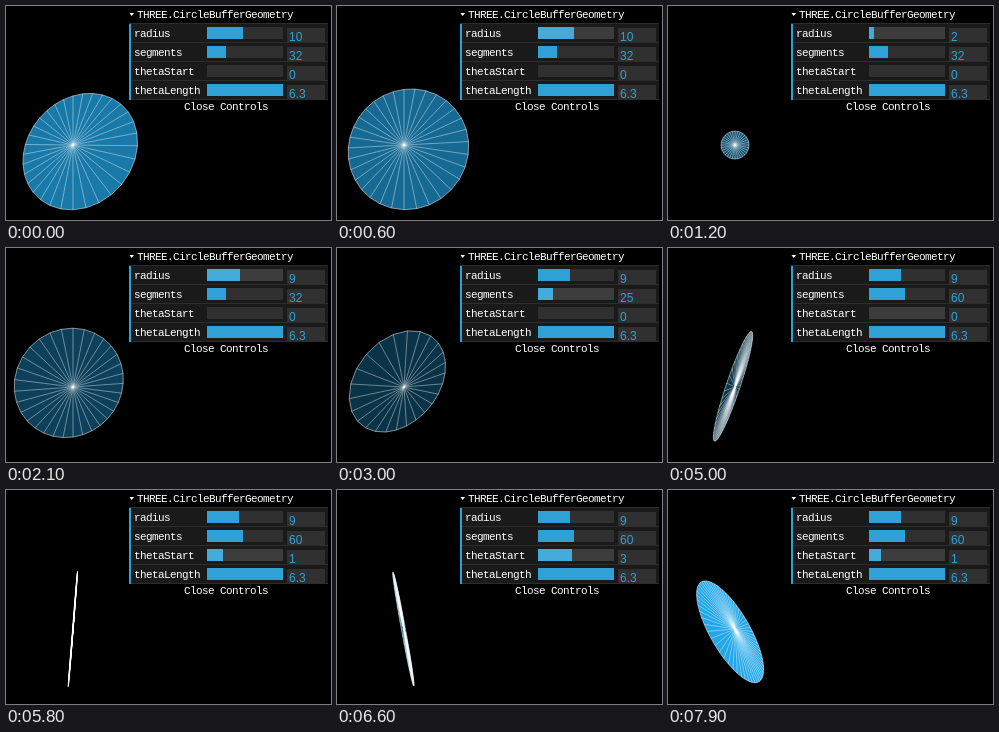
An HTML page with a canvas that plays this animation: 325x214 px, repeating every 8000 ms.

```html
<!DOCTYPE html>
<html>
<head>
<meta charset="utf-8">
<style>
html, body { margin: 0; width: 325px; height: 214px; overflow: hidden; background: #000; }
canvas { display: block; }
</style>
</head>
<body>
<canvas id="stage" width="325" height="214"></canvas>
<script>
const ctx = document.getElementById('stage').getContext('2d');
const LOOP = 8000, TAU = Math.PI * 2;
const CX = 67, CY = 139, CAMERA = 30, UNIT = 6.14;
const START_ANGLE = -0.427, SPIN = 0.3305; // radians, radians per second

// Linear interpolation through [time, value] points
function track(points, t) {
  if (t <= points[0][0]) return points[0][1];
  for (let i = 1; i < points.length; i++) {
    const [t0, a] = points[i - 1], [t1, b] = points[i];
    if (t <= t1) return a + (b - a) * (t - t0) / (t1 - t0);
  }
  return points[points.length - 1][1];
}

const radiusKeys = [[700, 10], [1200, 2.25], [1720, 10], [1900, 9.4], [2200, 9]];
const segmentKeys = [[2750, 32], [3000, 25], [3200, 21], [3750, 60]];
const startKeys = [[5100, 0], [6600, 2.85], [6900, 2.85], [7800, 1]];

function rect(x, y, w, h, color) {
  ctx.fillStyle = color;
  ctx.fillRect(x, y, w, h);
}

function text(str, x, y, font, color, spacing) {
  ctx.font = font;
  ctx.letterSpacing = spacing;
  ctx.fillStyle = color;
  ctx.fillText(str, x, y);
}

const label = (str, x, y) =>
  text(str, x, y, '11px "Liberation Mono", monospace', '#fff', '-0.6px');

function row(i, name, fraction, value, hover) {
  const y = 18 + i * 19;
  rect(123, y, 199, 18, '#1a1a1a');
  rect(123, y + 18, 199, 1, '#2c2c2c');
  rect(123, y, 2, 19, '#2fa1d6');
  label(name, 128, y + 13);
  rect(201, y + 3, 76, 12, hover ? '#3c3c3c' : '#303030');
  rect(201, y + 3, Math.round(76 * fraction), 12, hover ? '#44abda' : '#2fa1d6');
  rect(281, y + 4, 38, 14, '#303030');
  text(value, 283, y + 17, '12px "Liberation Sans", Arial, sans-serif', '#2fa1d6', '0px');
}

function panel(t, radius, segments, start) {
  ctx.fillStyle = '#fff';
  ctx.beginPath();
  ctx.moveTo(123.5, 7);
  ctx.lineTo(128, 7);
  ctx.lineTo(125.7, 10);
  ctx.fill();
  label('THREE.CircleBufferGeometry', 131, 12);
  rect(123, 17, 199, 1, '#2c2c2c');
  row(0, 'radius', (radius - 1) / 19, radius.toFixed(0), t > 600 && t < 2300);
  row(1, 'segments', segments / 128, String(segments), t > 2700 && t < 4200);
  row(2, 'thetaStart', start / TAU, start.toFixed(0), t > 4700);
  row(3, 'thetaLength', 1, '6.3', false);
  label('Close Controls', 178, 104);
}

// Two light directions shine on the face, on top of its own glow
function shade(s, c) {
  const n = [s, -s * c, c * c];
  const key = Math.max(0, (n[0] + 2 * n[1] + n[2]) / Math.sqrt(6));
  const light = key + Math.max(0, n[1]);
  const [r, g, b] = [[7, 21], [37, 98], [52, 137]].map(([glow, k]) => Math.min(255, glow + k * light));
  return `rgb(${r}, ${g}, ${b})`;
}

function disc(angle, radius, segments, start) {
  const s = Math.sin(angle), c = Math.cos(angle);
  const rim = [];
  for (let i = 0; i < segments; i++) {
    const phi = start + i / segments * TAU;
    const x = radius * Math.cos(phi), y = radius * Math.sin(phi);
    const depth = y * s - x * s * c;
    const k = UNIT * CAMERA / (CAMERA - depth);
    rim.push([CX + x * c * k, CY - (y * c + x * s * s) * k]);
  }
  ctx.fillStyle = shade(s, c);
  ctx.beginPath();
  rim.forEach(p => ctx.lineTo(...p));
  ctx.fill();

  ctx.strokeStyle = 'rgba(255, 255, 255, 0.5)';
  rim.forEach((p, i) => {
    for (const [q, width] of [[[CX, CY], 0.8], [rim[(i + 1) % segments], 1]]) {
      ctx.lineWidth = width;
      ctx.beginPath();
      ctx.moveTo(...p);
      ctx.lineTo(...q);
      ctx.stroke();
    }
  });
}

function draw(now) {
  const t = now % LOOP;
  const radius = track(radiusKeys, t);
  const segments = Math.round(track(segmentKeys, t));
  const start = track(startKeys, t);
  rect(0, 0, 325, 214, '#000');
  disc(START_ANGLE + SPIN * t / 1000, radius, segments, start);
  panel(t, radius, segments, start);
}

const begin = performance.now();
function frame() {
  draw(performance.now() - begin);
  requestAnimationFrame(frame);
}
frame();
</script>
</body>
</html>
```
